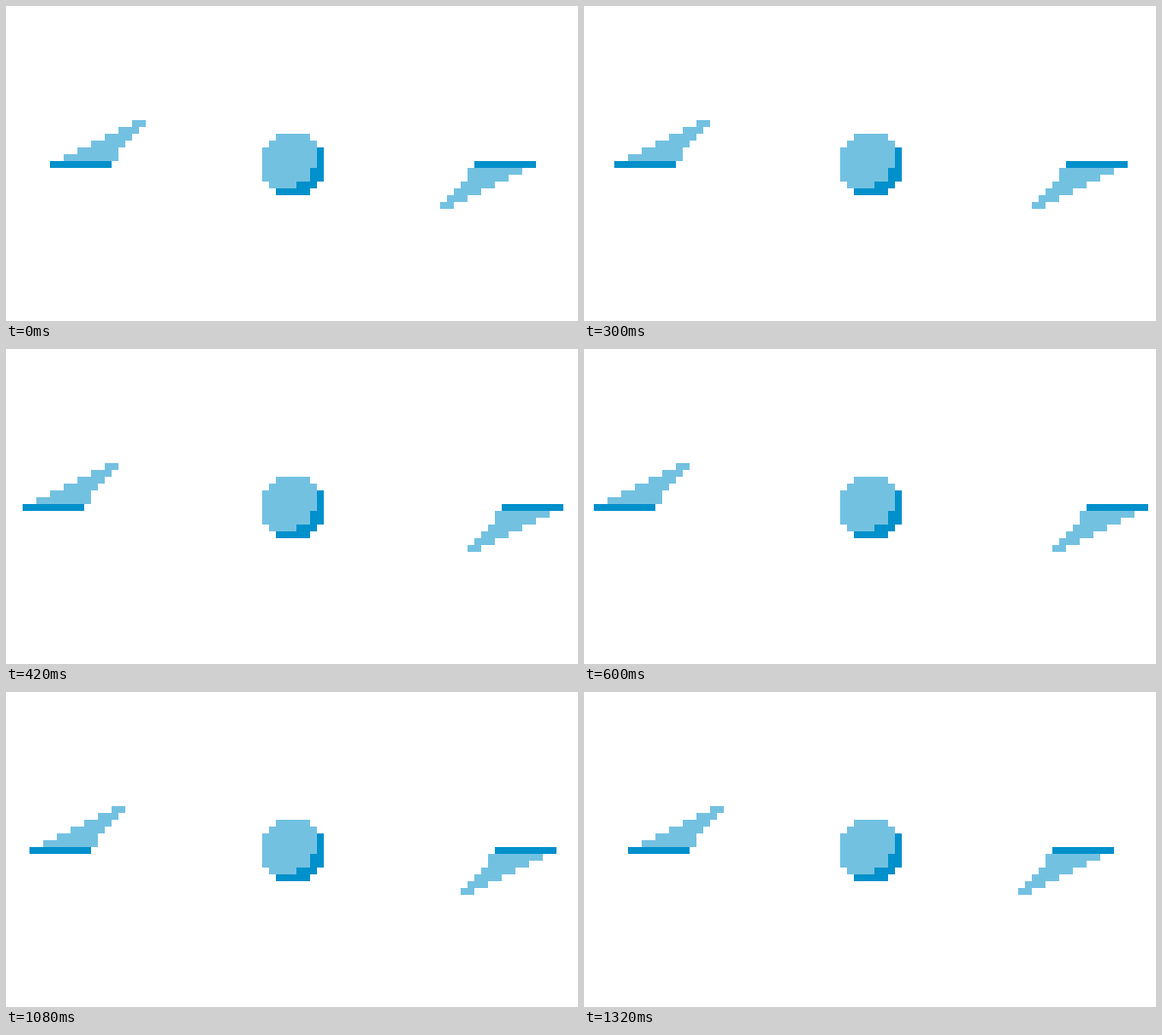
Recreate the animation shown at these times as an HTML page with a canvas. Size 585 by 323 pixels, loop 1500 ms.

```html
<!DOCTYPE html>
<html lang="en">
<head>
<meta charset="utf-8">
<title>Pixel wings</title>
<style>
  html, body { margin: 0; height: 100%; overflow: hidden; background: #fff; }
  canvas { display: block; }
</style>
</head>
<body>
<canvas id="stage" width="585" height="323"></canvas>
<script>
const ctx = document.getElementById("stage").getContext("2d");
const CELL = 7, LEFT = 3, TOP = 5;
const LIGHT = "#73c1e1", DARK = "#0090cb";
const LOOP = 1500;

// Rows are [column, row, width, height] in cells.
const wing = {
  light: [[18, 16, 2, 1], [16, 17, 3, 1], [14, 18, 4, 1], [12, 19, 5, 1], [10, 20, 6, 1], [8, 21, 8, 1]],
  dark: [[6, 22, 9, 1]]
};
const ball = {
  dark: [[45, 20, 1, 5], [44, 23, 1, 2], [42, 25, 3, 1], [39, 26, 5, 1]],
  light: [[39, 18, 5, 1], [38, 19, 7, 1], [37, 20, 8, 3], [37, 23, 7, 2], [38, 25, 4, 1]]
};

// Times at which the wings move one cell outwards; the way back mirrors them.
const steps = [180, 300, 360, 420, 600];

function spreadAt(time) {
  return steps.filter(t => time >= t && time < LOOP - t).length;
}

function drawShape(shape, shift = 0, rotated = false) {
  for (const [rows, color] of [[shape.light, LIGHT], [shape.dark, DARK]]) {
    ctx.fillStyle = color;
    for (const [column, row, width, height] of rows) {
      const x = rotated ? 83 - column - width : column;
      const y = rotated ? 45 - row - height : row;
      ctx.fillRect(LEFT + (x + shift) * CELL, TOP + y * CELL, width * CELL, height * CELL);
    }
  }
}

function draw(now) {
  const spread = spreadAt(now % LOOP);
  ctx.fillStyle = "#fff";
  ctx.fillRect(0, 0, 585, 323);
  drawShape(wing, -spread);
  drawShape(ball);
  drawShape(wing, spread, true);
  requestAnimationFrame(draw);
}

const start = performance.now();
draw(0);
function draw0() {}
</script>
</body>
</html>
```
